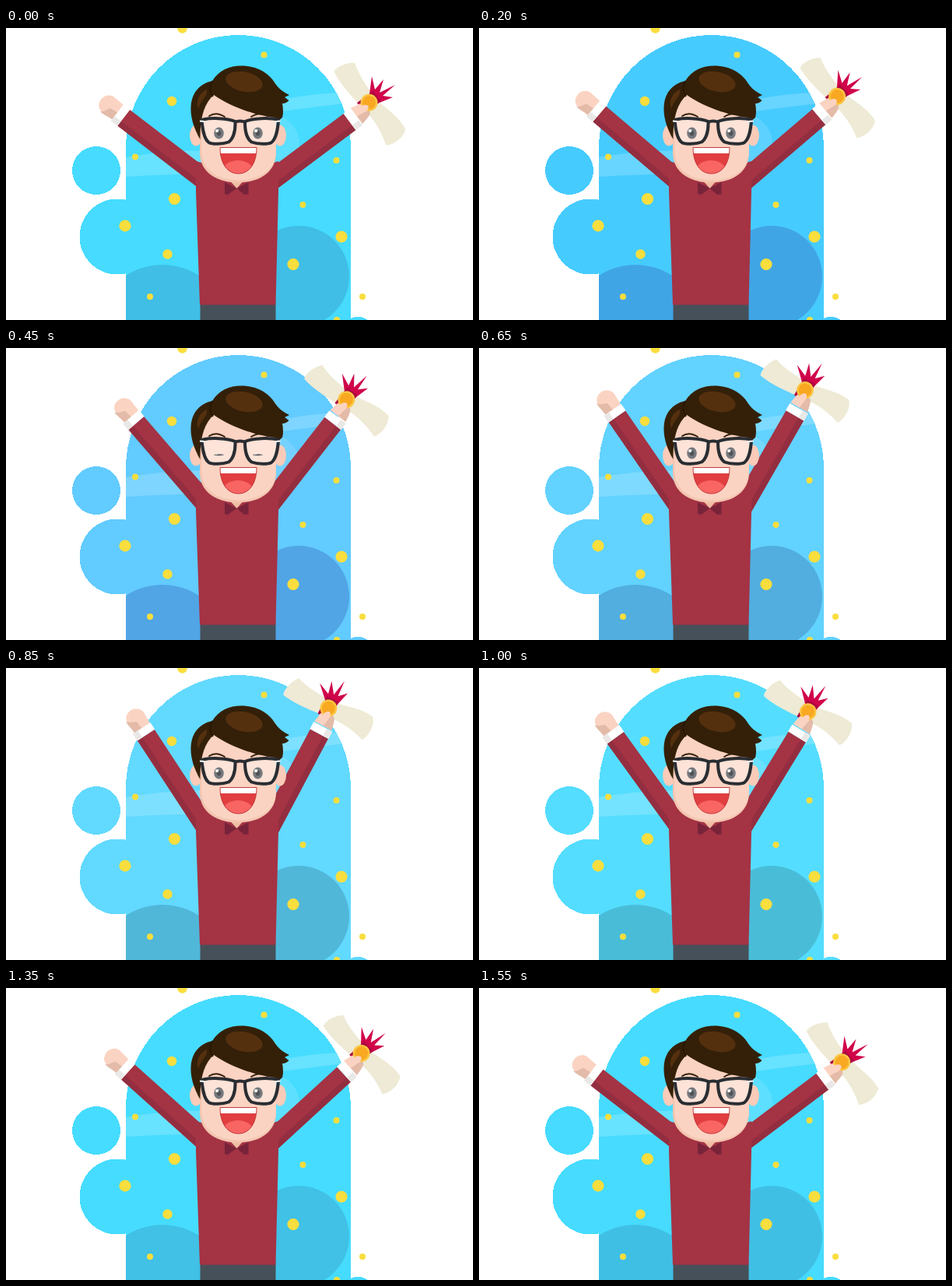
Write an HTML page that moves like this. It is 600 by 375 pixels and loops after 1.6 s.

```html
<!DOCTYPE html>
<html lang="en">
<head>
<meta charset="utf-8">
<title>Graduation cheer</title>
<style>
html, body { margin: 0; width: 100%; height: 100%; overflow: hidden; background: #fff; }
svg { display: block; width: 100vw; height: 100vh; }
.sky { fill: var(--sky); }
.deep { fill: var(--deep); }
.skin { fill: #fbd3c2; }
.shade { fill: #e3bba8; }
.red { fill: #a43344; }
.hair { fill: #342008; }
.glow { fill: #55300f; }
.dots { stroke: #f9de3e; stroke-linecap: round; }
.rim { fill: none; stroke: #292d32; stroke-width: 4; stroke-linejoin: round; }
</style>
</head>
<body>
<svg id="stage" viewBox="0 0 600 375" preserveAspectRatio="none">
  <defs>
    <path id="arch" d="M154 375V154a144.500 145 0 0 1 289 0V375Z"/>
    <clipPath id="dome"><use href="#arch"/></clipPath>
    <path id="lips" d="M275 153.500H322C322 175 312 187 298.500 187S275 175 275 153.500Z"/>
    <clipPath id="mouth"><use href="#lips"/></clipPath>
    <path id="face" d="M249 86H347V160C347 184 327 198.500 298 198.500S249 184 249 160Z"/>
    <path id="lens" d="M251.500 118C262 115 284 115.500 294.500 120C295 134 291 143 286 146.500C278 149.500 265 149.500 260.500 147C254 142 252.500 130 251.500 118Z"/>
    <g id="sleeve">
      <rect class="red" x="-140" y="-13" width="140" height="26"/>
      <rect fill="#932e40" x="-140" y="5.500" width="140" height="7.500"/>
      <rect fill="#fff" y="-13.500" width="10.500" height="27"/>
      <rect fill="#eae8e7" y="5.500" width="10.500" height="8"/>
    </g>
    <g id="eye">
      <ellipse rx="6.300" ry="7.600" fill="#77797d"/>
      <ellipse rx="2.800" ry="3.600" fill="#505358"/>
      <circle cx="-2.300" cy="-3" r="2.100" fill="#fff"/>
    </g>
  </defs>

  <g class="sky" shape-rendering="crispEdges">
    <circle cx="116" cy="183" r="31"/>
    <circle cx="143" cy="268" r="48.500"/>
    <circle cx="452" cy="394" r="23"/>
    <use href="#arch"/>
  </g>
  <g clip-path="url(#dome)">
    <g fill="#fff" fill-opacity=".18">
      <path d="M154 166Q200 158 260 157V187Q210 188 154 191Z"/>
      <path d="M340 95Q380 85 443 82V96Q390 102 340 109Z"/>
      <ellipse cx="325" cy="148" rx="52" ry="42" fill-opacity=".12"/>
    </g>
    <g class="deep">
      <circle cx="376" cy="319" r="65"/>
      <circle cx="201" cy="390" r="86"/>
    </g>
  </g>
  <g class="dots">
    <path stroke-width="8" d="M331.500 34.500h0M166 165.500h0M185 345h0M424.500 170h0M381.500 227h0M458 345h0M425 375h0"/>
    <path stroke-width="12.500" d="M226.500 .5h0M213 94h0M207.500 290.500h0"/>
    <path stroke-width="15.200" d="M216.500 219.500h0M153 254h0M431 268h0M369 303.500h0"/>
  </g>

  <g id="left">
    <path class="skin" d="M151 99L138 88C128 83 118 92 119.500 102C121 108 131 113 137 118Z"/>
    <path class="shade" d="M121 107C127 108 130 104 134 103L144 109L137 118C131 113 124 111 121 107Z"/>
    <use href="#sleeve" transform="translate(151.200 115.200) scale(-1 1) rotate(-37.500)"/>
  </g>

  <g id="right">
    <path fill="#eeead5" transform="translate(1.300 1.800)" d="M420 54C424 47 438 42 447 43C451 57 463 75 474 89C485 101 503 111 512 128C509 140 497 148 487 149C483 137 477 124 467 112C455 98 430 75 420 54Z"/>
    <path fill="#d0044a" d="M466 92L470 62L474 79L485 66L480 83L500 73L484 87L497 89L477 97Z"/>
    <path fill="#ae0640" d="M451 96L471.500 81L482 94L461 109Z"/>
    <path class="skin" d="M443 103L453 98C458 95 464 100 467 106C469 111 464 116 458 123Z"/>
    <path class="shade" d="M451 113C457 111 462 106 467 106C470 111 464 116 458 123Z"/>
    <circle cx="466.500" cy="95.700" r="11" fill="#fcc642"/>
    <circle cx="466.500" cy="95.700" r="8.500" fill="#f8a821"/>
    <ellipse class="skin" cx="458.500" cy="104" rx="8" ry="4.500" transform="rotate(-25 458.500 104)"/>
    <use href="#sleeve" transform="translate(441.500 120.500) rotate(-36.800)"/>
  </g>

  <path fill="#465059" d="M249.500 353H346.500V375H249.500Z"/>
  <path class="red" d="M244 171L262 176H334L350 171V210L346.500 355.500H249L244 210Z"/>
  <path fill="#efbca3" d="M284 192H309L296.500 206Z"/>
  <path fill="#78233a" d="M281 198L296.500 206L311.500 198V213.500L306 214L296.500 206L285 214L281 213Z"/>

  <g fill="#f9cbb8">
    <ellipse cx="244" cy="138" rx="8" ry="13.500"/>
    <ellipse cx="352" cy="138" rx="8" ry="13.500"/>
  </g>
  <use href="#face" fill="#f4c5b0"/>
  <use href="#face" class="skin" transform="translate(8.500 2) scale(.975)"/>
  <g fill="none" stroke="#342008" stroke-width="1.800" stroke-linecap="round">
    <path d="M261 113Q270 107 281 114"/>
    <path d="M315 114Q326 107 336 113"/>
  </g>
  <path class="hair" d="M249.500 143C242 130 237 116 237.500 102C238 83 249 71 265 68C274 53 290 47.500 306 48.500C326 50 339 60 345 70C350 78 356 82 364 86L358 89L363.500 93Q360 97 355 97Q357 108 355 115L349 120L347 115C330 114 292 104 267 86C255 96 249 115 249.500 143Z"/>
  <path d="M265 68Q259 78 266 88" fill="none" stroke="#241503" stroke-width="1.500"/>
  <ellipse class="glow" cx="306" cy="69" rx="24" ry="12.500" transform="rotate(12 306 69)"/>
  <path class="glow" d="M247 104C243 92 250 82 258 79C260 87 250 93 247 104Z"/>

  <g fill="#fff" fill-opacity=".35">
    <use href="#lens"/>
    <use href="#lens" transform="translate(601.600) scale(-1 1)"/>
  </g>
  <g id="eyes">
    <use href="#eye" x="273.500" y="135"/>
    <use href="#eye" x="323.500" y="135"/>
  </g>
  <g class="rim">
    <use href="#lens"/>
    <use href="#lens" transform="translate(601.600) scale(-1 1)"/>
    <path d="M294 121Q300.800 118 307.500 121"/>
  </g>
  <path d="M249 119.500L255 120M346.500 120L352.500 119.500" stroke="#fff" stroke-width="1.800"/>

  <g clip-path="url(#mouth)">
    <path fill="#e03e40" d="M270 150H326V190H270Z"/>
    <ellipse cx="298" cy="183" rx="19" ry="13" fill="#f86563"/>
    <path fill="#fff" d="M270 150H326V161H270Z"/>
  </g>
  <use href="#lips" fill="none" stroke="#c63a3e"/>
</svg>
<script>
const LOOP = 1600, STEP = 50;
const $ = id => document.getElementById(id);
const stage = $("stage"), left = $("left"), right = $("right"), eyes = $("eyes");

const clamp = (v, lo, hi) => Math.min(hi, Math.max(lo, v));
const ramp = (t, from, to) => clamp((t - from) / (to - from), 0, 1);
const setColor = (name, ...rgb) => stage.style.setProperty(name, `rgb(${rgb.map(Math.round)})`);

function paintSky(t) {
  const cool = ramp(t, 0, 200);
  const pale = ramp(t, 200, 450) - ramp(t, 850, 1150);
  const warm = ramp(t, 450, 1150);
  const rest = ramp(t, 1150, LOOP);
  setColor("--sky", 70 + 28 * pale, 219 - 16 * cool + 18 * ramp(t, 450, 950) - 2 * rest, 255);
  setColor("--deep", 64 + 17 * pale, 190 - 25 * cool + 31 * warm - 6 * rest,
    229 - 13 * (ramp(t, 450, 850) - ramp(t, 1150, 1350)));
}

function paint(t) {
  paintSky(t);
  const lift = (1 - Math.cos(2 * Math.PI * t / LOOP)) / 2;
  left.setAttribute("transform", `rotate(${19.5 * lift} 251 185)`);
  right.setAttribute("transform", `rotate(${-25.5 * lift} 342 190)`);

  const open = clamp(Math.abs(t - 450) / 100, 0.14, 1);
  eyes.setAttribute("transform", `translate(0 ${137.5 * (1 - open)}) scale(1 ${open})`);
}

const start = performance.now();
function tick() {
  const t = (performance.now() - start) % LOOP;
  paint(Math.floor(t / STEP) * STEP);
  requestAnimationFrame(tick);
}
tick();
</script>
</body>
</html>
```
